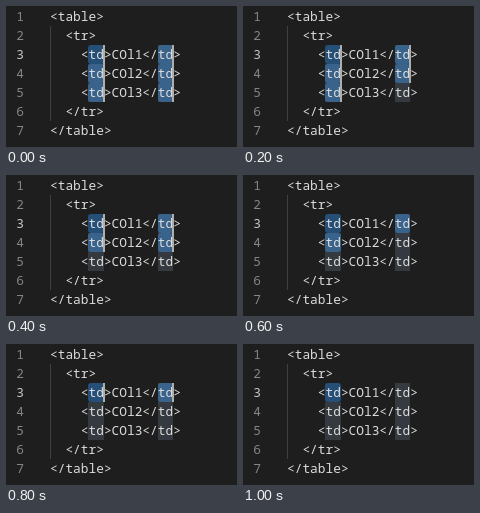
An HTML page that plays this animation: 231x141 px, repeating every 1.2 s.

```html
<!DOCTYPE html>
<html lang="en">
<head>
<meta charset="utf-8">
<title>Undoing multiple selections</title>
<style>
  html, body { margin: 0; width: 100%; height: 100%; overflow: hidden; background: #1e1e1e; }
  svg { display: block; width: 231px; height: 141px; }
  text { font: 500 12.83px "Noto Sans Mono", "DejaVu Sans Mono", monospace; fill: #dcdcdc; white-space: pre; }
  .number { fill: #858585; text-anchor: end; font-weight: 400; }
  .active { fill: #c6c6c6; }
  .guide { fill: #404040; }
  .selection { fill: #264f78; }
  .match { fill: #add6ff; fill-opacity: .15; }
  .cursor { fill: #aeafad; }
</style>
</head>
<body>
<svg id="stage" viewBox="0 0 231 141"></svg>
<script>
const STEP = 200, STEPS = 6;
const TOP = 1, LINE = 19, LEFT = 44, CHAR = 7.7;
const lines = [
  [0, "<table>"],
  [2, "<tr>"],
  [4, "<td>COl1</td>"],
  [4, "<td>COl2</td>"],
  [4, "<td>COl3</td>"],
  [2, "</tr>"],
  [0, "</table>"]
];
const tags = [{ x: 82, w: 16, caret: 97 }, { x: 152, w: 15, caret: 166 }];
const stage = document.getElementById("stage");

function add(name, attrs, content = "") {
  const node = document.createElementNS("http://www.w3.org/2000/svg", name);
  for (const key in attrs) node.setAttribute(key, attrs[key]);
  node.textContent = content;
  return stage.appendChild(node);
}

function box(kind, x, y, width, rx = 0) {
  return add("rect", { class: kind, x, y, width, height: LINE, rx });
}

const show = (node, on) => node.setAttribute("visibility", on ? "visible" : "hidden");

// Selections in the order they were made; the first one is the primary
// selection, which its own matches do not tint.
const marks = [2, 3, 4].flatMap(row => tags.map(({ x, w, caret }) => {
  const y = TOP + row * LINE;
  return { selection: box("selection", x, y, w, 3), x, y, w, caret };
}));
for (const { x, y, w } of marks.slice(1)) box("match", x, y, w);

lines.forEach(([indent, code], row) => {
  const top = TOP + row * LINE, y = top + 14;
  if (indent) box("guide", LEFT, top, 1);
  add("text", { class: row === 2 ? "number active" : "number", x: 18, y }, row + 1);
  add("text", { x: LEFT + indent * CHAR, y }, code);
});

for (const mark of marks) mark.cursor = box("cursor", mark.caret, mark.y, 2);

function draw(time) {
  const step = Math.floor(time / STEP) % STEPS;
  const blinkOn = step !== 3 && step !== 5;
  marks.forEach((mark, i) => {
    const selected = i < marks.length - step;
    show(mark.selection, selected);
    show(mark.cursor, selected && blinkOn);
  });
}

let start;
function tick(now) {
  start ??= now;
  draw(now - start);
  requestAnimationFrame(tick);
}
draw(0);
requestAnimationFrame(tick);
</script>
</body>
</html>
```
